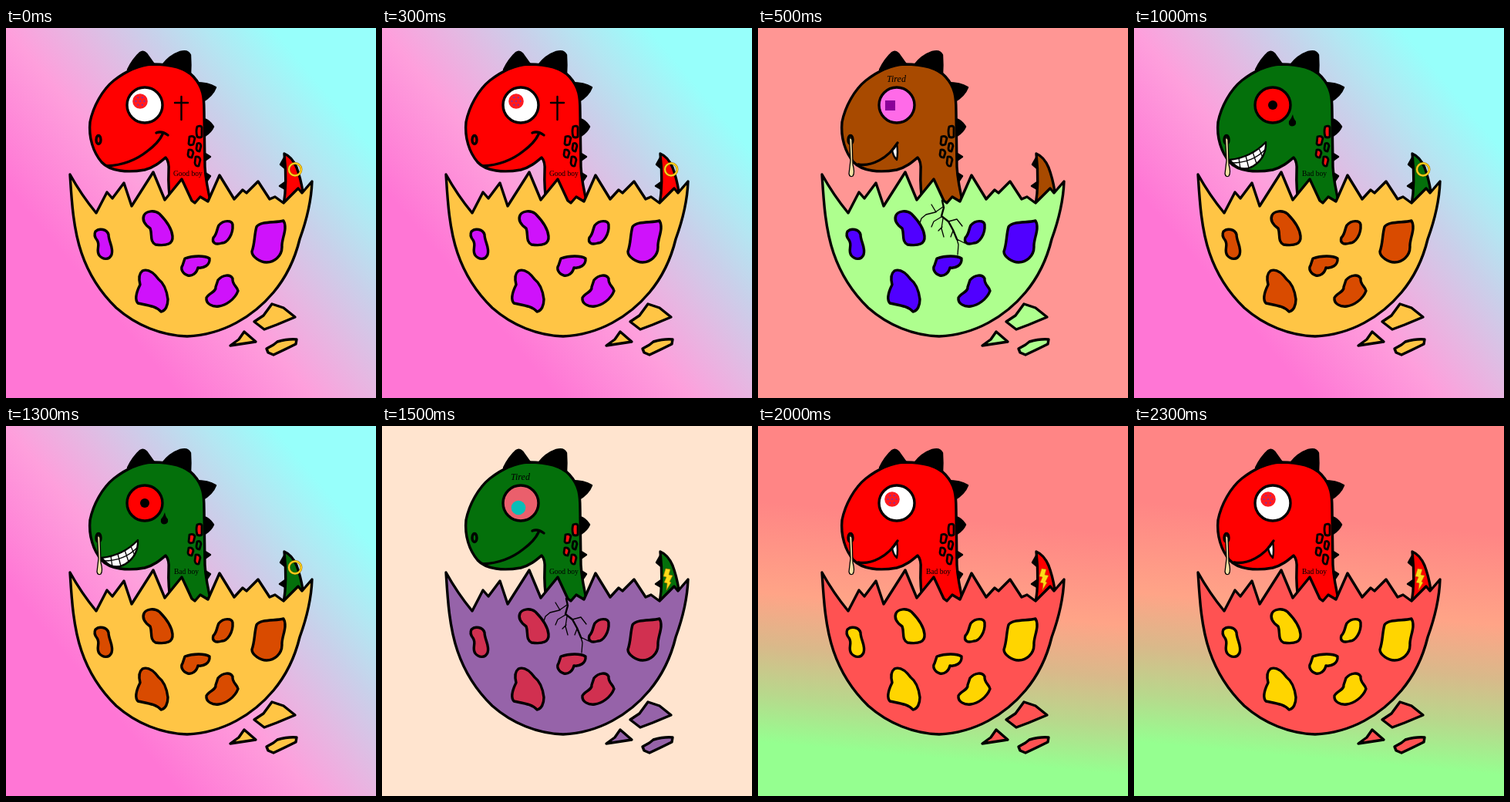
An HTML page that plays this animation: 480x480 px, repeating every 2.5 s.

```html
<!DOCTYPE html>
<html lang="en">
<head>
<meta charset="utf-8">
<title>Hatching dinosaur</title>
<style>
  html, body { margin: 0; width: 100%; height: 100%; overflow: hidden; }
  svg { display: block; width: 100vw; height: 100vh; }
  .ink { stroke: #000; stroke-width: 3.4; stroke-linejoin: round; stroke-linecap: round; }
  .line { fill: none; }
  .mid { stroke-width: 2.4; }
  .thin { stroke-width: 1.3; }
  text { font-family: "Liberation Serif", "Times New Roman", serif; font-size: 9.5px; }
  #tired { font-size: 12px; font-style: italic; }
</style>
</head>
<body>
<svg viewBox="0 0 480 480">
  <defs>
    <linearGradient id="candy" gradientUnits="userSpaceOnUse" x1="100" y1="325" x2="405" y2="71">
      <stop offset="0" stop-color="#ff76d5"/>
      <stop offset=".33" stop-color="#fe9fdc"/>
      <stop offset=".5" stop-color="#e6b7e2"/>
      <stop offset=".68" stop-color="#c9d0ea"/>
      <stop offset=".82" stop-color="#b4e6f2"/>
      <stop offset="1" stop-color="#97fffb"/>
    </linearGradient>
    <linearGradient id="melon" gradientUnits="userSpaceOnUse" x1="254" y1="120" x2="226" y2="430">
      <stop offset="0" stop-color="#ff8585"/>
      <stop offset=".38" stop-color="#ffa487"/>
      <stop offset=".6" stop-color="#d9b98a"/>
      <stop offset=".8" stop-color="#b8d88c"/>
      <stop offset="1" stop-color="#95ff90"/>
    </linearGradient>
  </defs>

  <rect id="sky" width="480" height="480"/>

  <g class="ink">
    <path class="mid" d="M158 54Q165 40 174 32Q178 29 182 33L192 47ZM203 48Q212 36 226 31Q236 28 239 35Q240 48 239 62ZM246 71Q262 71 272 77Q268 88 254 96ZM257 118Q264 120 269 128Q266 135 258 140ZM257 162L265 167L258 172ZM257 187L265 192L259 201Z"/>
    <path class="mid" d="M361 168L356 177L362 182ZM362 200L355 205L362 209Z"/>
    <g id="skin">
      <path d="M267 232Q259 200 258 180L257 108C257 90 256 77 243 63C230 49 207 47 190 47C170 48 153 58 140 68C125 80 113 102 109 122C107 142 113 161 124 174C135 186 158 188 180 184C192 181 200 174 207 168Q212 173 211 186Q210 207 214 232Z"/>
      <path d="M360 230Q365 202 361 163Q371 167 377 181Q382 194 385 212L380 230Z"/>
    </g>
  </g>

  <g id="scales" class="ink" style="stroke-width:2.8">
    <path d="M248 128Q253 126 254 129L254 141Q251 143 248 141Q246 134 248 128Z"/>
    <path d="M238 141Q243 139 245 143L243 151Q238 153 237 150Z"/>
    <path id="plain" d="M248 150Q252 148 253 153L251 160Q247 160 247 156Z"/>
    <path d="M237 158Q242 157 243 162L241 168Q236 168 236 164Z"/>
    <path d="M246 167Q251 166 252 171L250 179Q246 180 245 175Z"/>
  </g>

  <g class="ink">
    <circle id="eye" cx="180" cy="100" r="23"/>
    <ellipse id="nostril" cx="120" cy="145" rx="3" ry="5.5"/>
  </g>

  <g id="speckled">
    <circle cx="174" cy="95" r="9.8" fill="#ff1a20"/>
    <g id="dots" fill="#5a32c8"></g>
  </g>
  <rect id="square" x="165" y="94" width="13" height="13" fill="#8a0099"/>
  <circle id="bead" cx="180" cy="100" r="6"/>
  <circle id="teal" cx="177" cy="106" r="9.3" fill="#08bdb8"/>

  <path id="smile" class="ink line" d="M131 179C150 178 168 172 183 160Q198 149 203 138M195 136Q202 133 210 139"/>
  <g id="fang" class="ink">
    <path class="mid" d="M174 158L180 150Q182 162 180 171Q175 166 174 158Z" fill="#fff"/>
    <path class="line" d="M130 177C147 180 169 169 181 149"/>
  </g>
  <g id="grin" class="ink">
    <path class="mid" d="M124 171Q152 168 171 148Q172 168 155 179Q138 189 124 171Z" fill="#fff"/>
    <path class="line thin" d="M127 175Q153 175 170 158M136 169L138 183M145 166L149 182M154 161L159 176M162 156L167 168"/>
  </g>
  <path id="drip" class="ink thin" fill="#f3dfa3" d="M118.500 144Q120 141 122 145L123 177Q126 188 123 192Q119 194 118 189Q119 180 120 172Z"/>

  <path id="cross" class="ink line mid" d="M227.500 89V119M219 97H236"/>
  <path id="tear" d="M206 112Q204 118 201 121Q200 127 205 127.500Q211 127 210 121Q207 118 206 112Z"/>
  <text id="tired" x="167" y="70">Tired</text>
  <text id="good" x="217" y="192">Good boy</text>
  <text id="bad" x="218" y="192">Bad boy</text>

  <g id="ring" fill="none">
    <circle cx="375" cy="183.500" r="8" stroke="#a87500" stroke-width="3"/>
    <circle cx="375" cy="183.500" r="8" stroke="#ffd21c" stroke-width="2"/>
  </g>
  <path id="bolt" fill="#ffdc18" stroke="#b86a00" stroke-width=".6" d="M368 185L374 186L372 193L377 194L373 202L375 203L369 213L370 204L366 203L369 196L365 195Z"/>

  <g id="shell" class="ink">
    <path d="M83 190Q98 217 117 240L131 213L138 221L153 201L163 231Q177 209 191 187L206 223L228 196L241 224L245 227L252 219L262 225L277 191L296 222L307 210L312 214L327 199L342 222L349 219L360 227L379 208L384 214L397 199C396 228 389 252 381 274C374 303 362 325 347 343C321 374 282 398 235 400C202 399 169 386 143 363Q112 333 98 292C87 260 85 222 83 190Z"/>
    <path d="M345 358L360 363L375 375L351 385L335 391L322 381L334 373Z"/>
    <path d="M309 394L324 407L291 412L302 404Z"/>
    <path d="M338 416L347 411L352 407Q366 403 377 404L376 410Q362 417 347 424L340 421Z"/>
  </g>

  <g id="spots" class="ink">
    <path d="M116 264C121 259 131 261 133 268C133 277 140 285 137 294C134 301 126 301 121 295C116 288 123 282 118 275C114 270 115 266 116 264Z"/>
    <path d="M179 243C182 237 193 236 199 241C207 249 215 260 216 270C217 280 209 283 194 281C186 277 190 267 187 260C180 255 176 250 179 243Z"/>
    <path d="M276 256C282 249 293 249 294 255C295 268 287 279 280 279C271 282 267 278 269 272C274 267 273 262 276 256Z"/>
    <path d="M325 258C330 250 350 253 360 250C366 260 357 274 358 284C358 296 348 304 338 304C330 304 319 297 319 290C323 279 322 268 325 258Z"/>
    <path d="M232 299C243 295 258 295 264 299C265 308 256 312 249 311C247 319 241 322 236 321C229 319 226 312 229 308Z"/>
    <path d="M177 315C184 312 192 318 198 326C206 332 209 344 210 352C210 360 207 367 201 368C195 361 185 360 171 357C166 351 170 341 174 333C172 325 172 319 177 315Z"/>
    <path d="M275 327C281 320 291 319 294 325C293 333 300 335 301 341C297 352 285 360 276 361C268 362 259 358 260 350C263 344 273 342 272 336Z"/>
  </g>

  <g id="crack" class="ink line">
    <path class="mid" d="M239 224L241 233L238 244L247 251L253 262L258 274"/>
    <path class="thin" d="M258 274L260 281L259 294M240 232L230 239L218 242L212 247L210 253M231 239L225 229M238 245L228 251L225 258M240 247L238 260L241 271M247 251L258 248L265 257M239 258L234 263M253 263L250 271M258 274L268 279"/>
  </g>
</svg>

<script>
const HOLD = 500;
const $ = id => document.getElementById(id);

const looks = [
  { sky: 'url(#candy)', skin: '#ff0000', shell: '#ffc545', spots: '#cf12fb', eye: '#fff',
    parts: 'speckled smile cross good ring' },
  { sky: '#ff9694', skin: '#a84a00', shell: '#aeff8e', spots: '#5000ff', eye: '#ff6ae8',
    parts: 'square fang drip tired crack' },
  { sky: 'url(#candy)', skin: '#04700b', shell: '#ffc545', spots: '#d94b00', eye: '#ff0000', scales: '#ff1010',
    parts: 'bead grin drip tear bad ring' },
  { sky: '#ffe4cf', skin: '#04700b', shell: '#9663a9', spots: '#d13050', eye: '#ea5f6c', scales: '#ff1010',
    parts: 'teal smile tired good bolt crack' },
  { sky: 'url(#melon)', skin: '#ff0000', shell: '#ff5252', spots: '#ffd500', eye: '#fff',
    parts: 'speckled fang drip bad bolt' }
];

const fills = ['sky', 'skin', 'shell', 'spots', 'eye'];
const extras = [...new Set(looks.flatMap(l => l.parts.split(' ')))];

for (let i = 0; i < 7; i++) {
  const dot = document.createElementNS('http://www.w3.org/2000/svg', 'circle');
  const a = i * Math.PI / 3;
  const r = i < 6 ? 5.5 : 0;
  dot.setAttribute('cx', 174 + r * Math.cos(a));
  dot.setAttribute('cy', 95 + r * Math.sin(a));
  dot.setAttribute('r', 0.9);
  $('dots').append(dot);
}

let shown = -1;

function draw(time) {
  const n = Math.floor(time / HOLD) % looks.length;
  if (n === shown) return;
  shown = n;
  const look = looks[n];
  const on = look.parts.split(' ');
  for (const id of fills) $(id).setAttribute('fill', look[id]);
  $('scales').setAttribute('fill', look.scales || look.skin);
  $('plain').setAttribute('fill', look.skin);
  $('nostril').setAttribute('fill', look.skin);
  for (const id of extras) $(id).style.display = on.includes(id) ? '' : 'none';
}

function tick() {
  draw(performance.now());
  requestAnimationFrame(tick);
}
tick();
</script>
</body>
</html>
```
